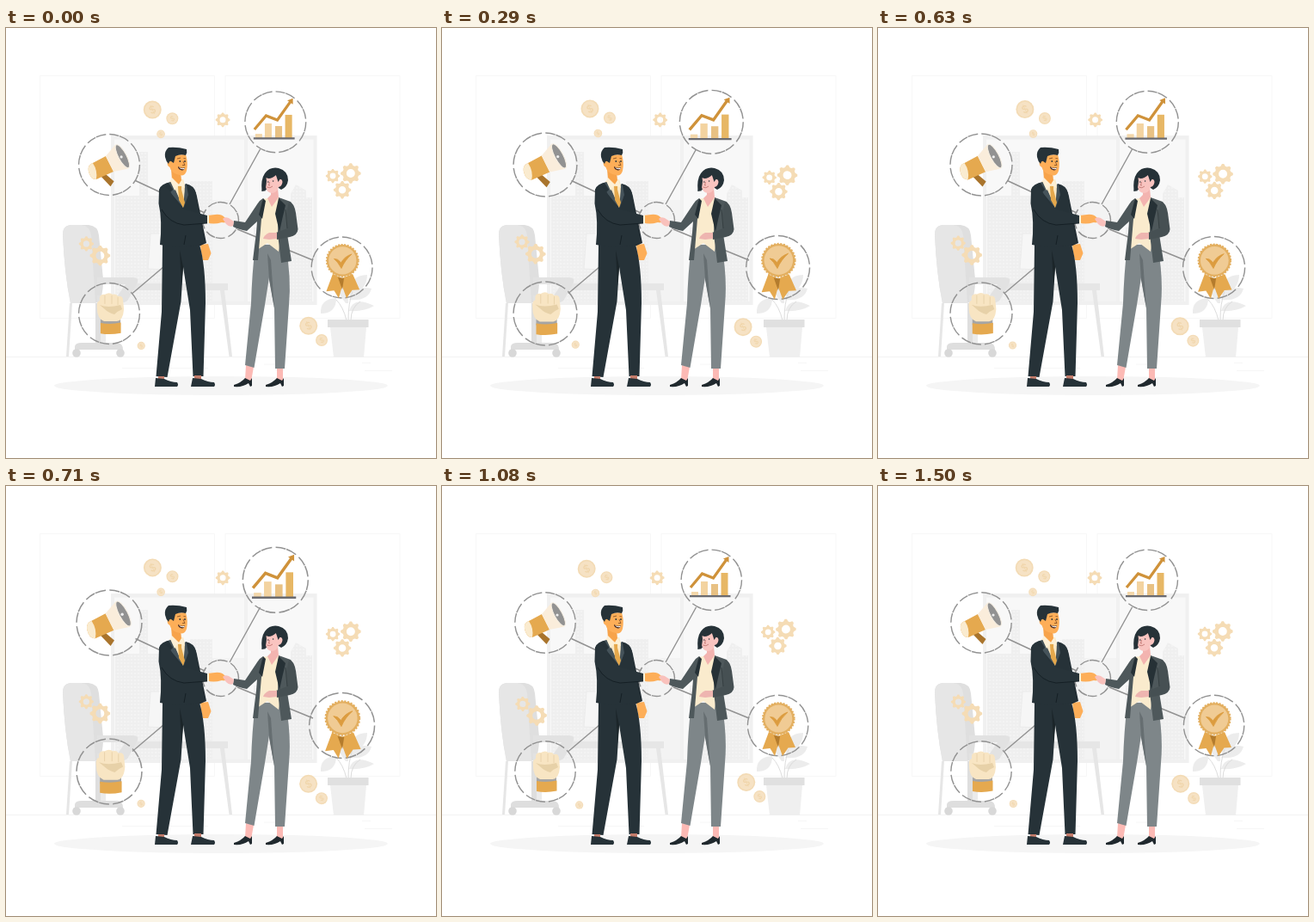
These frames come from a looping animation (500 px wide and 500 px high, 1.54 s). An HTML page:

```html
<!DOCTYPE html>
<html lang="en">
<head>
<meta charset="utf-8">
<title>Partnership</title>
<style>
  html, body { margin: 0; width: 100%; height: 100%; overflow: hidden; background: #fff; }
  svg { display: block; width: 100vw; height: 100vh; }
  .ring { fill: none; stroke: #929292; stroke-width: 1.4; stroke-dasharray: 11 .8 11.8 4.05; }
  .link { fill: none; stroke: #929292; stroke-width: 1.4; }
  .coin text { font: 500 12px Inter, sans-serif; text-anchor: middle; fill: #f0d5aa; }
</style>
</head>
<body>
<svg viewBox="0 0 500 500">
  <defs>
    <pattern id="panes" width="4" height="4" patternUnits="userSpaceOnUse">
      <path d="M0 0H4V4H0Z" fill="#efefef"/><path d="M1 1H3.4V3.2H1Z" fill="#f3f3f3"/>
    </pattern>
  </defs>

  <!-- room -->
  <g fill="none" stroke="#f7f7f7">
    <path d="M39.5 55.5H242.5V337.5H39.5ZM255 55.5H458V337.5H255Z"/>
    <path d="M0 382.5H500" stroke="#f3f3f3"/>
    <path d="M414 389.5H424M417 398.5H449M135 395.5H235M300 391H318" stroke="#f6f6f6"/>
  </g>
  <path d="M122 125H361.500V322H122Z" fill="#f0f0f0"/>
  <path d="M126 129.500H357.500V318H126Z" fill="#f8f8f8"/>
  <path d="M127 195H155V144H165V195H185V318H127ZM214 178H240V318H214ZM331 193L337 182L349 189V197H356V318H331ZM288 232H331V318H288Z" fill="url(#panes)"/>
  <path d="M240 200H278V318H240Z" fill="#f3f3f3"/>
  <path d="M277 129H281V318H277Z" fill="#f1f1f1"/>
  <ellipse cx="250" cy="416" rx="194" ry="11" fill="#f5f5f5"/>

  <!-- desk and chair -->
  <path d="M165 280L168 239H200V282Z" fill="#f6f6f6" stroke="#ebebeb"/>
  <path d="M140 297H258V305H140Z" fill="#e6e6e6"/>
  <path d="M249 305H254L263 382H259.500ZM77 320L73 382H70L74 320Z" fill="#e6e6e6"/>
  <path d="M66 240Q66 229 77 229H96Q107 230 108 241L113 292Q113 320 103 320H75Q68 286 66 240Z" fill="#dfdfdf"/>
  <path d="M66 240Q66 229 77 229H88Q98 230 99 242L104 320H75Q68 286 66 240Z" fill="#e6e6e6"/>
  <path d="M106 290H148Q155 290 153 296L143 314Q141 320 130 320H106V311H130L139 298H106Z" fill="#e2e2e2"/>
  <path d="M104 320H116V366H104Z" fill="#dedede"/><path d="M110 320H116V366H110Z" fill="#ebebeb"/>
  <path d="M80 374V370Q81 366 88 366H130Q136 367 136 374Z" fill="#dedede"/>
  <g fill="#d8d8d8"><circle cx="82" cy="378" r="4.800"/><circle cx="133" cy="378" r="4.800"/></g>

  <!-- plant -->
  <g fill="#ececec">
    <path d="M395 320Q378 298 383 284Q398 288 398 320Z"/>
    <path d="M400 312Q399 287 420 287Q420 303 402 312Z"/>
    <path d="M366 332Q365 315 384 314Q384 332 366 332ZM399 316Q407 298 425 303Q421 318 399 316ZM399 329Q404 311 428 323Q417 330 399 329Z"/>
  </g>
  <path d="M396 340Q392 324 384 316M398 340Q398 320 403 306M401 340Q401 325 412 318" fill="none" stroke="#dcdcdc"/>
  <path d="M377 348H419L416 383H381Z" fill="#efefef"/>
  <path d="M374 339H421.500V348H374Z" fill="#e0e0e0"/>

  <!-- network -->
  <circle class="ring" cx="249.500" cy="223.500" r="21"/>
  <path class="link" d="M150.500 177.500L231 215M295.500 141L260 205M147 308.500L190 272M269 234L357 270"/>

  <!-- man -->
  <path d="M226 252L235 251L238.500 262L235 270H229L227 261Z" fill="#fdae58"/>
  <path d="M210 182Q220 185 222 196L233 250L224 254L209 225Z" fill="#222d33"/>
  <path d="M182 252H225Q232 275 232 320L229.500 405H217.500L214 328L206 278L203.500 318L187.500 406L174.500 405L181 330Z" fill="#263238"/>
  <path d="M206 278L204 300L202 258Z" fill="#1b2529"/>
  <path d="M177 405H184V410H177ZM219 404H227V410H219Z" fill="#c37b6a"/>
  <path d="M174 407L184 408Q192 412 199 412Q201 415 199 417H173ZM217 407L227 408Q235 412 242 412Q244 415 242 417H215Z" fill="#263238"/>
  <path d="M190 178L206 176L210 190L208 212L201 210Z" fill="#fae8c4"/>
  <path d="M178 188Q180 181 192 179L206 209L209 181Q219 183 221 192L226 225L231 250Q205 258 179 252Q182 224 177.500 204Z" fill="#263238"/>
  <path d="M189 180L193 179L206 209L191 191L194 188ZM208 181L210 183L212 194L207 208Z" fill="#45535a"/>
  <path d="M200 184L204 184L204 188L208 203L206 209L201 200Z" fill="#e5a84c"/>
  <path d="M192 164L203 168L204 177L201 182L193 176Z" fill="#f7a34a"/>
  <path d="M191 178L193 174L201 182L196 189ZM201 182L205 176L208 186Z" fill="#fdf0d6"/>
  <path d="M194 148L209 147Q212 157 210 166Q208 173 202 171Q192 169 190.500 162Q186.500 160 188 155Z" fill="#fdae58"/>
  <path d="M185 150Q184 143 189 139Q199 138 210 141Q211 145 209 148Q203 146 197 149L195 157L192 155Q190 154 189 158Q186 155 185 150Z" fill="#263238"/>
  <path d="M200 161Q204 164 208 162Q207 167 203 165Q200 164 200 161Z" fill="#4a2b20"/><path d="M201 161.700Q204 164 207.500 162.600V164Q203 165 201 161.700Z" fill="#fff"/>
  <path d="M206 155L208 159.500H205M199 152L203 151M206.500 151.500L209 152" fill="none" stroke="#7d4a22" stroke-width=".8"/>
  <circle cx="202.300" cy="155" r=".9" fill="#263238"/><circle cx="208" cy="155" r=".9" fill="#263238"/>
  <path d="M234 218L243 217Q250 216 254 220L259 225Q255 227 251 226Q240 229 234 226Z" fill="#fdae58"/>
  <path d="M178 188Q185 181 191 190Q197 204 208 211L234 218V227L207 229Q187 227 178.500 207Z" fill="#28343a"/>
  <path d="M234 227L207 229Q190 227 181 211M207 252L209 241" fill="none" stroke="#111b20" stroke-width=".8"/>
  <path d="M234 218H236V227H234Z" fill="#fff2d9"/>

  <!-- woman -->
  <path d="M279 392L288 394L285 411L278 409ZM315 394H322V410H315Z" fill="#fcbab5"/>
  <path d="M290 252H325Q332 290 329 322L324 396H313L312 326L306 290L301 322L288.500 395L278 392L285 320Q286 285 290 252Z" fill="#7e8689"/>
  <path d="M304 262L306 293L312 326L308 270Z" fill="#666e71"/>
  <path d="M265 415Q274 412 278 407L284 410L286 407V416L284 417L282 413Q275 418 265 417ZM302 415Q311 412 315 407L321 410L323 407V416L321 417L319 413Q312 418 302 417Z" fill="#20292e"/>
  <path d="M298 199L317 196L321 226L317 260L304 250L292 258Z" fill="#faebcd"/>
  <path d="M308 187L316 186L317 197L309 208L304 198L308 194Z" fill="#f3b4b0"/>
  <path d="M299 198L293 270H287L291 238L292 225L280 236Q270 234 264 231L265 224L278 226L292 205Q295 200 299 198Z" fill="#4e585b"/>
  <path d="M317 197L331 202Q335 207 335 214L327 240L332 271L320 273L316 240Z" fill="#4e585b"/>
  <path d="M317 198L325 206L321 223L318 237L313 216ZM299 198L302 201L298 222L294 217Z" fill="#263136"/>
  <path d="M329 202Q335 203 337 215L339.500 234Q339 241 330 243L315 246L314 238L327 233L326 216Z" fill="#465053"/>
  <path d="M327 233L325 211" stroke="#30393c" fill="none" stroke-width=".8"/>
  <path d="M315 238L306 238Q300 241 299 245L306 246L315 245Z" fill="#eeb5b0"/>
  <path d="M265 225L259 221Q254 219 252 222L256 228Q260 232 264 230Z" fill="#f9c1bc"/>
  <path d="M297.500 190Q296 176 301 169Q307 161 317 163Q328 166 328 177Q327 185 320 188L314 184Z" fill="#263238"/>
  <path d="M302.500 174Q307 177 314 171L317 176Q321 175 321.500 179Q321 184 317 185Q315 192 309 192Q303 191 302 185Z" fill="#f9c4c0"/>
  <path d="M301.500 171L303 178L301.500 189.500H297.500ZM313 168L321 172L316.500 179Z" fill="#263238"/>
  <circle cx="304.800" cy="179" r=".8" fill="#263238"/><circle cx="310.600" cy="178" r=".8" fill="#263238"/>
  <path d="M303.500 185Q307 187 310 184M306.500 179L305.500 183H307" fill="none" stroke="#b5625e" stroke-width=".7"/>

  <!-- badges -->
  <g class="badge" data-x="120" data-y="159">
    <circle class="ring" cx="120" cy="159" r="35.200"/>
    <path d="M110 172L116 170L125.500 178L121.500 184Z" fill="#a9742c"/>
    <path d="M96 166Q95 159 101 157L116 149L125 167L105 176Q98 176 96 166Z" fill="#e5a94f"/>
    <path d="M96 166Q95 159 101 157Q107 166 105 176Q98 176 96 166Z" fill="#faebcf"/>
    <path d="M116 149L127.500 135.500L142.500 163.500L125 167Z" fill="#faeddb"/>
    <ellipse cx="135.300" cy="149.300" rx="4.600" ry="15" transform="rotate(-28 135.300 149.300)" fill="#929292" stroke="#f6efe3"/>
    <circle cx="134" cy="150" r="1.600" fill="#eee"/>
  </g>
  <g class="badge" data-x="313.300" data-y="109.300">
    <circle class="ring" cx="313.300" cy="109.300" r="35.200"/>
    <path d="M290 123H298V128H290Z" fill="#f3d7aa"/><path d="M301 111H309V128H301Z" fill="#f3d3a0"/>
    <path d="M313 114H321V128H313Z" fill="#e8c183"/><path d="M324.500 101H332.500V128H324.500Z" fill="#e7b765"/>
    <path d="M288 128.200H335.500" stroke="#6b6b70" stroke-width="2.200"/>
    <path d="M289 118L302.500 102L315.500 107L330.500 86" fill="none" stroke="#cf923a" stroke-width="3.200"/>
    <path d="M327 84.500L333.500 82L333.500 89Z" fill="#cf923a"/>
  </g>
  <g class="badge" data-x="390.600" data-y="278.500">
    <circle class="ring" cx="390.600" cy="278.500" r="35.200"/>
    <path d="M380 286L372.500 306L381.500 305L387 314L393 292Z" fill="#e5a94f"/>
    <path d="M403 286L411 304L402.500 304.500L396 314L388 292Z" fill="#e5a94f"/>
    <path d="M386 290L391 304L393 291Z" fill="#b47c2d"/>
    <circle cx="391.300" cy="270.500" r="18.300" fill="#e3af60" stroke="#e3af60" stroke-width="2" stroke-dasharray="2 1.500"/>
    <circle cx="391.300" cy="270.500" r="16" fill="#f0cb94"/>
    <path d="M381.500 268.500Q386 268 389.500 273Q394 265.500 402 263Q394 270 390 279.500Q386 272 381.500 268.500Z" fill="#dc9c3f" stroke="#dc9c3f" stroke-width=".8"/>
  </g>
  <g class="badge" data-x="120" data-y="332">
    <circle class="ring" cx="120" cy="332" r="35.200"/>
    <path d="M110 338H133V345H110Z" fill="#a5a5a5"/>
    <path d="M106 326Q105 318 109 317Q108 309 115 310Q120 307 124 310Q128 309 130 312Q136 311 136 317L137 327Q136 340 129 341H114Q106 338 106 326Z" fill="#f8e5c3"/>
    <path d="M115 311L115 321M123 311L123 321M130 313V322" stroke="#e6cfa6" stroke-width=".8" fill="none"/>
    <path d="M109 322Q118 326 133 322L135 327Q130 329 126 333Q119 331 115 327Z" fill="#e7d1a8"/>
    <path d="M110 343Q122 345 133.500 342.500V354.500Q121 357 110 355Z" fill="#e5a94f"/>
  </g>

  <g id="drift"></g>
</svg>
<script>
const NS = 'http://www.w3.org/2000/svg';
const drift = document.getElementById('drift');
const badges = [...document.querySelectorAll('.badge')];

function add(parent, tag, attrs) {
  const el = document.createElementNS(NS, tag);
  for (const k in attrs) el.setAttribute(k, attrs[k]);
  return parent.appendChild(el);
}

function gear(x, y, r) {
  const pts = [];
  for (let i = 0; i < 32; i++) {
    const a = (i - .5) * Math.PI / 16;
    const d = i % 4 < 2 ? r : r * .8;
    pts.push((x + d * Math.cos(a)).toFixed(2) + ' ' + (y + d * Math.sin(a)).toFixed(2));
  }
  const h = r * .42;
  const hole = `M${x - h} ${y}a${h} ${h} 0 1 0 ${2 * h} 0a${h} ${h} 0 1 0 ${-2 * h} 0Z`;
  add(drift, 'path', { d: `M${pts.join('L')}Z${hole}`, fill: '#f5dcb5', 'fill-rule': 'evenodd' });
}

function coin(x, y, r) {
  const g = add(drift, 'g', { class: 'coin', transform: `translate(${x} ${y}) scale(${r / 10.5})` });
  add(g, 'circle', { r: 10.5, fill: '#f3dbb5' });
  add(g, 'circle', { r: 8.8, fill: '#f6e2c4' });
  add(g, 'text', { y: 4.3, transform: 'rotate(-25)' }).textContent = '$';
}

[[252, 106.8, 8.4], [93.4, 251, 8.6], [109.4, 264.7, 11.8],
 [380, 172, 8.2], [400.8, 169, 11.8], [391, 188.2, 10.2]].forEach(a => gear(...a));
[[170.2, 95, 10.5], [193.3, 105.3, 7], [180, 123.4, 4.8],
 [351.8, 346.2, 10.5], [367.1, 363, 7], [157.3, 369.5, 4.6]].forEach(a => coin(...a));

const LOOP = 1540, TICK = 1000 / 24, SPAN = 1500;
const PULSE = [[0, 1], [.1, 1.1], [.3, 1], [.4, 1], [.5, 1.1], [.6, 1], [1, 1]];
const SWAY = [[0, 0], [.25, 1], [.75, -1], [1, 0]];

function at(steps, p) {
  const i = Math.max(1, steps.findIndex(s => s[0] >= p));
  const [p0, v0] = steps[i - 1], [p1, v1] = steps[i];
  return v0 + (v1 - v0) * (p - p0) / (p1 - p0);
}

function draw(now) {
  const tick = Math.floor((now % LOOP + 5) / TICK);
  const p = Math.min(1, (tick * TICK + 10) / SPAN);
  const s = at(PULSE, p);
  for (const b of badges) {
    const { x, y } = b.dataset;
    b.setAttribute('transform', `translate(${x} ${y}) scale(${s}) translate(${-x} ${-y})`);
  }
  drift.setAttribute('transform', `rotate(${at(SWAY, p)} 248.5 222)`);
}

const start = performance.now();
function loop() {
  draw(performance.now() - start);
  requestAnimationFrame(loop);
}
loop();
</script>
</body>
</html>
```
